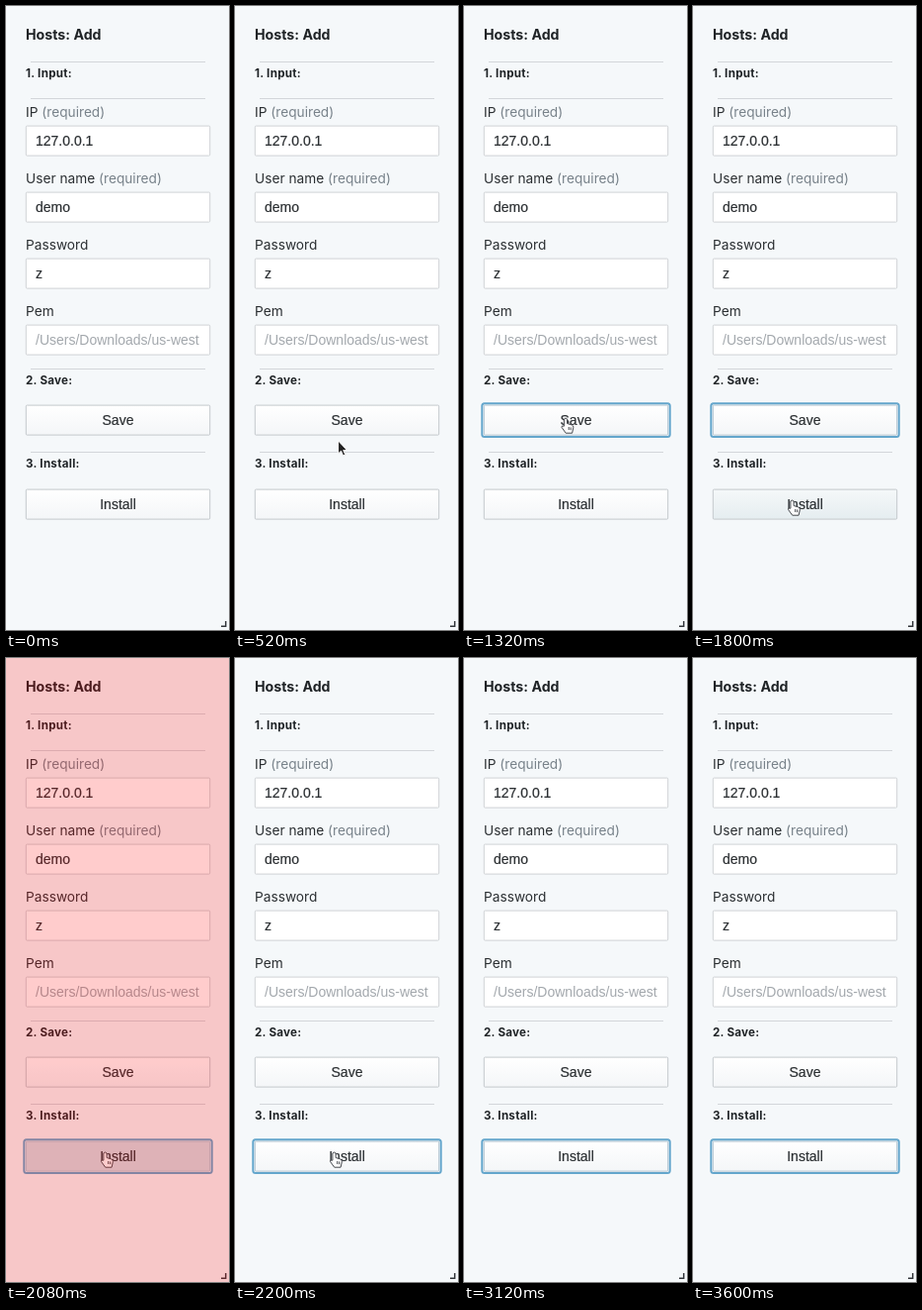
An HTML page for the animation above (3680 ms loop, 226 by 630 pixels).

```html
<!DOCTYPE html>
<html lang="en">
<head>
<meta charset="utf-8">
<title>Add a host</title>
<style>
  html, body { margin: 0; width: 100%; height: 100%; overflow: hidden; background: #f5f8fa; }
  svg { display: block; width: 226px; height: 630px; }
  text { fill: #2b2f32; }
  .title { font: 700 14.2px Inter, sans-serif; fill: #1f2326; }
  .step { font: 700 11.6px Inter, sans-serif; letter-spacing: .28px; fill: #1f2326; }
  .label { font: 400 13.7px Inter, sans-serif; }
  .note { fill: #78828a; }
  .value { font: 14px "Liberation Sans", Arial, sans-serif; stroke: #2b2f32; stroke-width: .2px; }
  .hint { fill: #a3a8ad; stroke: none; }
  .button { text-anchor: middle; }
</style>
</head>
<body>
<svg id="stage" viewBox="0 0 226 630">
  <defs>
    <linearGradient id="idle" x2="0" y2="1">
      <stop stop-color="#ffffff"/><stop offset="1" stop-color="#f4f6f8"/>
    </linearGradient>
    <linearGradient id="hover" x2="0" y2="1">
      <stop stop-color="#f5f8f9"/><stop offset="1" stop-color="#e5edf0"/>
    </linearGradient>
  </defs>
  <rect width="226" height="630" fill="#f5f8fa"/>
  <g id="form"></g>
  <path d="M218 626.3H222.7V621" fill="none" stroke="#33363b" stroke-width="1.5"/>
  <g id="cursor" fill="#fff" stroke="#44474c" stroke-linejoin="round">
    <path id="hand" d="M-1.6 1Q0 -1 1.6 1V5.5L6.4 7Q8.2 7.6 7.8 9.8L6.6 15.2H.2L-4 9.4Q-4.4 7.2 -1.6 8.2Z M3.2 9v3M5.2 9.4v2.8"/>
    <path id="arrow" d="M0 0V13L3 10.3L5 15L7.2 14L5.2 9.6H9Z" fill="#222" stroke="#fff"/>
  </g>
  <rect id="flash" width="226" height="630" fill="#f00" opacity=".2"/>
</svg>
<script>
const LOOP = 3680;
const $ = id => document.getElementById(id);
const form = $('form');

function add(tag, attrs, text = '', parent = form) {
  const el = document.createElementNS('http://www.w3.org/2000/svg', tag);
  for (const key in attrs) el.setAttribute(key, attrs[key]);
  el.textContent = text;
  parent.append(el);
  return el;
}

const write = (cls, x, y, text) => add('text', { class: cls, x, y }, text);
const box = (y, fill, stroke) =>
  add('rect', { x: 20.3, y: y + .1, width: 186.4, height: 30, rx: 1, fill, stroke });

function field(y, label, value, required, hint) {
  const caption = write('label', 20, y - 9, label);
  if (required) add('tspan', { class: 'note' }, ' (required)', caption);
  box(y, '#fff', '#cfd2d5');
  write(hint ? 'value hint' : 'value', 30, y + 20, value);
}

function button(y, label) {
  const face = box(y, 'url(#idle)', '#c3c8cc');
  const ring = add('rect', {
    x: 18.3, y: y - 1.7, width: 190.4, height: 33.6, rx: 2.5,
    fill: 'none', stroke: '#64a6cc', 'stroke-width': 2
  });
  write('value button', 113.5, y + 20, label);
  return (state, focused) => {
    face.setAttribute('fill', state === 'press' ? '#d6dee5' : `url(#${state})`);
    face.setAttribute('stroke', focused ? '#b5c5d0' : '#c3c8cc');
    show(ring, focused);
  };
}

function show(el, on) {
  el.setAttribute('visibility', on ? 'inherit' : 'hidden');
}

write('title', 20, 34, 'Hosts: Add');
for (const y of [56, 93, 366, 450])
  add('path', { d: `M25 ${y + .5}H202`, stroke: '#d3d6da' });
write('step', 20, 72, '1. Input:');
field(121, 'IP', '127.0.0.1', true);
field(188, 'User name', 'demo', true);
field(255, 'Password', 'z');
field(322, 'Pem', '/Users/Downloads/us-west', false, true);
write('step', 20, 382, '2. Save:');
const save = button(403, 'Save');
write('step', 20, 466, '3. Install:');
const install = button(488, 'Install');

// Pointer moves: start, end, from, to, easing
const easeOut = u => 1 - (1 - u) ** 2;
const easeInOut = u => u * u * (3 - 2 * u);
const easeIn = u => u * u;
const moves = [
  [240, 720, [112, 548], [103, 416], easeOut],
  [1320, 1720, [103, 416], [100.5, 499], easeInOut],
  [2320, 2840, [100.5, 499], [106, 632], easeIn]
];

function pointer(t) {
  const [start, end, from, to, ease] = moves.filter(m => m[0] <= t).pop() || moves[0];
  const u = ease(Math.min(1, Math.max(0, (t - start) / (end - start))));
  return from.map((v, i) => v + (to[i] - v) * u);
}

const within = (t, a, b) => t >= a && t < b;

function draw(time) {
  const t = Math.floor((time % LOOP) / 40) * 40;
  const [x, y] = pointer(t);
  const overSave = within(y, 403, 433);
  const overInstall = within(y, 488, 518);

  show($('cursor'), within(t, 280, 2840));
  $('cursor').setAttribute('transform', `translate(${x} ${y})`);
  show($('hand'), overSave || overInstall);
  show($('arrow'), !overSave && !overInstall);

  save(
    within(t, 1040, 1160) ? 'press' : overSave && within(t, 840, 1040) ? 'hover' : 'idle',
    within(t, 1040, 2080)
  );
  install(
    within(t, 2080, 2200) ? 'press' : overInstall && within(t, 1320, 2080) ? 'hover' : 'idle',
    t >= 2080
  );
  show($('flash'), within(t, 2080, 2200));
}

const began = performance.now();
function tick() {
  draw(performance.now() - began);
  requestAnimationFrame(tick);
}
tick();
</script>
</body>
</html>
```
